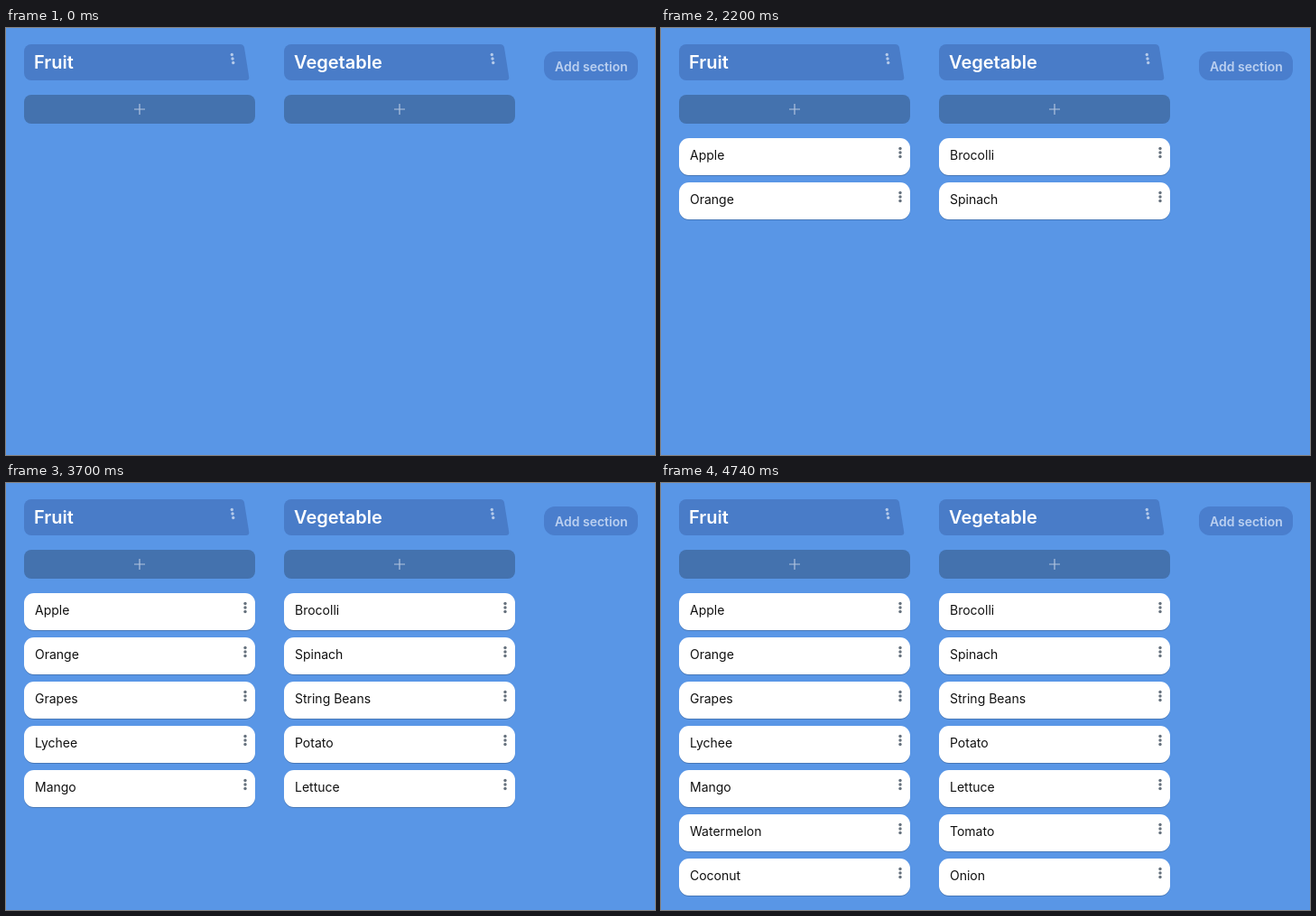
Animation of 719 by 473 pixels, one loop 5170 ms. Source, as an HTML page:

```html
<!DOCTYPE html>
<html lang="en">
<head>
<meta charset="utf-8">
<title>Board</title>
<style>
  html, body { margin: 0; width: 100%; height: 100%; overflow: hidden; background: #5996e6; }
  svg { display: block; width: 719px; height: 473px; font-family: Inter, sans-serif; }
  .head { fill: #497cc8; }
  .title { font-size: 20px; font-weight: 600; fill: #fff; }
  .head-dots { fill: #b5caea; }
  .bar { fill: #4472ae; }
  .plus { stroke: #b1c4de; stroke-width: 1.2; }
  .button { fill: #4a7ecd; }
  .label { font-size: 14px; font-weight: 600; fill: #bbd0f0; }
  .card { opacity: 0; animation: 5170ms step-end infinite; }
  .face { fill: #fff; }
  .shadow { fill: #000; opacity: .2; }
  .card text { font-size: 14px; fill: #111; }
  .dots { fill: #66717d; }
</style>
</head>
<body>
<svg id="board" viewBox="0 0 719 473"></svg>
<script>
  const LOOP = 5170;
  const columns = [
    { title: 'Fruit', x: 20, items: [
      ['Apple', 1540], ['Orange', 2000], ['Grapes', 2500], ['Lychee', 2980],
      ['Mango', 3490], ['Watermelon', 4280], ['Coconut', 4350]] },
    { title: 'Vegetable', x: 308, items: [
      ['Brocolli', 1770], ['Spinach', 2200], ['String Beans', 2760], ['Potato', 3130],
      ['Lettuce', 3700], ['Tomato', 4120], ['Onion', 4740]] }
  ];
  let rules = '';

  // Three stacked dots; slant shifts each one to the right of the last
  const dots = (cls, x, y, slant = 0) => `<g class="${cls}">` + [-1, 0, 1].map(i =>
    `<circle cx="${x + i * slant}" cy="${y + i * 4.5}" r="1.7"/>`).join('') + '</g>';

  function card([text, at], row, col) {
    const name = `show${col}${row}`;
    rules += `@keyframes ${name} { 0% { opacity: 0 } ${(at / LOOP * 100).toFixed(4)}%, 100% { opacity: 1 } }\n`;
    return `<g transform="translate(0 ${122 + row * 49})">
      <g class="card" style="animation-name: ${name}">
        <rect class="shadow" y="1" width="256" height="41" rx="11"/>
        <rect class="face" width="256" height="41" rx="11"/>
        <text x="12" y="24">${text}</text>
        ${dots('dots', 245, 16)}
      </g></g>`;
  }

  const column = ({ title, x, items }, col) => `<g transform="translate(${x} 0)">
    <path class="head" d="M8 18H239.5Q243.300 18 244 21.800L249.200 54Q249.800 58 246 58H8A8 8 0 0 1 0 50V26A8 8 0 0 1 8 18Z"/>
    <text class="title" x="11" y="45">${title}</text>
    ${dots('head-dots', 231, 34, .7)}
    <rect class="bar" y="74" width="256" height="32" rx="8"/>
    <path class="plus" d="M122 90H134M128 84V96"/>
    ${items.map((item, row) => card(item, row, col)).join('')}
  </g>`;

  const markup = columns.map(column).join('') +
    '<rect class="button" x="596" y="26" width="104" height="32" rx="12"/>' +
    '<text class="label" x="608" y="48">Add section</text>';

  document.head.appendChild(document.createElement('style')).textContent = rules;
  document.getElementById('board').innerHTML = markup;
</script>
</body>
</html>
```
